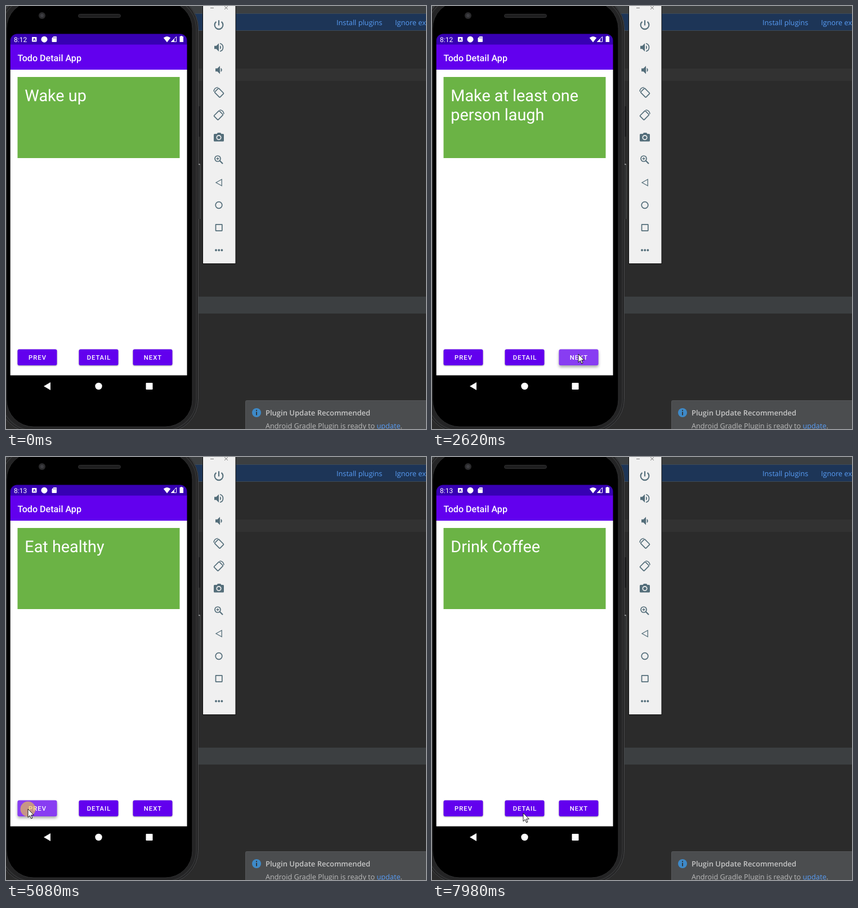
Recreate the animation shown at these times as an HTML page. Size 746 by 751 pixels, loop 8000 ms.

```html
<!DOCTYPE html>
<html lang="en">
<head>
<meta charset="utf-8">
<title>Todo Detail App</title>
<style>
  html, body { margin: 0; width: 100%; height: 100%; overflow: hidden; background: #2b2b2b; }
  svg { display: block; width: 746px; height: 751px; }
  text { text-rendering: geometricPrecision; }
  .ide { font-family: "Open Sans", "Noto Sans", sans-serif; font-size: 12.7px; }
  .app { font-family: Roboto, sans-serif; fill: #fff; }
  .label { font-size: 11.25px; font-weight: 500; letter-spacing: 1px; text-anchor: middle; }
  .tools { fill: #546e7a; }
  .line { fill: none; stroke: #546e7a; stroke-width: 1.7; }
  .bold { stroke-width: 2.1; }
  .thin { stroke-width: 1.3; }
</style>
</head>
<body>
<svg viewBox="0 0 746 751" xmlns="http://www.w3.org/2000/svg">
  <!-- editor -->
  <rect width="746" height="751" fill="#2b2b2b"/>
  <rect width="746" height="13" fill="#3c3f41"/>
  <rect x="300" y="13" width="446" height="31" fill="#1d3557"/>
  <path d="M300 13.5H746M300 43.5H746" stroke="#3c4a58"/>
  <rect x="340" y="111" width="406" height="22" fill="#323232"/>
  <rect x="340" y="516" width="406" height="30" fill="#3c3f41"/>
  <g class="ide" fill="#589df6">
    <text x="587" y="34">Install plugins</text>
    <text x="691" y="34">Ignore extension</text>
  </g>
  <rect x="425.5" y="700.5" width="330" height="60" rx="2" fill="#4b4d4f" stroke="#555759"/>
  <circle cx="445" cy="722" r="8" fill="#3e8ac8"/>
  <path d="M445 717v2M445 720.5v6" stroke="#33383d" stroke-width="2"/>
  <g class="ide" fill="#bbb">
    <text x="461" y="727" font-size="13" font-weight="600" fill="#c6c6c6">Plugin Update Recommended</text>
    <text x="461" y="750">Android Gradle Plugin is ready to <tspan fill="#589df6" text-decoration="underline">update</tspan>.</text>
  </g>

  <!-- phone body -->
  <path d="M343.5 178V232M343.5 279V378" stroke="#1c1c1d" stroke-width="3"/>
  <path d="M344.5 281V378" stroke="#58595a" stroke-width="1.2"/>
  <circle cx="343.5" cy="281" r="1.3" fill="#999"/>
  <rect x="-12" y="-18" width="354" height="775" rx="58" fill="#242425"/>
  <rect x="-8" y="-14" width="346" height="767" rx="55" fill="none" stroke="#343536" stroke-width="1.5"/>
  <rect x="-11.5" y="-17.5" width="353" height="774" rx="58" fill="none" stroke="#48494b"/>
  <rect x="1" y="-8" width="330" height="755" rx="48" fill="#000" stroke="#303132"/>
  <circle cx="64" cy="17" r="6" fill="#2a2a2c"/>
  <circle cx="64" cy="17" r="3" fill="#3d3d42"/>
  <rect x="128.5" y="14.5" width="75" height="6" rx="3" fill="#1e1e1f" stroke="#303031"/>

  <!-- app -->
  <path d="M7.7 69V61.500a12 12 0 0 1 12-12H309.500a12 12 0 0 1 12 12V69z" fill="#3700b3"/>
  <rect x="7.7" y="113" width="313.800" height="542.700" fill="#fff"/>
  <rect x="7.7" y="68.500" width="313.800" height="44.600" fill="#6200ee"/>
  <rect x="20.5" y="126" width="288" height="144" fill="#6bb345"/>
  <g class="app">
    <text id="clock" x="14" y="64" font-size="12"></text>
    <rect x="46" y="55" width="8.5" height="8.5" rx="1"/>
    <path d="M48.2 61.7L50.2 57L52.3 61.7M49 60.2H51.5" fill="none" stroke="#3700b3"/>
    <circle cx="68" cy="59.2" r="5.5"/>
    <path d="M84.5 54H89a1 1 0 0 1 1 1V63a1 1 0 0 1-1 1H82.5a1 1 0 0 1-1-1V57z"/>
    <path d="M84.5 55.5v2M86.5 55.5v2M88.5 55.5v2" stroke="#3700b3" stroke-width=".8"/>
    <path d="M286 64.5L279.8 56.5Q286 51.5 292.2 56.5z"/>
    <path d="M302.5 54.5V63.5H293.5z" fill="none" stroke="#fff"/>
    <path d="M299 58V64H293z"/>
    <path d="M310 54V53h3V54h2V64h-6.5V54z"/>
    <text x="20.5" y="97.5" font-size="16.1" font-weight="500">Todo Detail App</text>
    <g font-size="28.8">
      <text id="line0" x="33.3" y="169.2"></text>
      <text id="line1" x="33.3" y="203"></text>
    </g>
    <g id="buttons"></g>
    <path d="M67 675L79 668V682z"/>
    <circle cx="164.5" cy="675" r="6.2"/>
    <rect x="248.5" y="669" width="12" height="12" rx="1"/>
  </g>

  <!-- emulator toolbar -->
  <rect x="349.5" y="-1" width="58.5" height="458.5" fill="#f0f0f0" stroke="#0c0c0c"/>
  <path d="M363 3.500H369M388 .5L394 6M394 .5L388 6" stroke="#777" fill="none"/>
  <g class="tools">
    <path class="line bold" transform="translate(378 33.8)" d="M0-8.500V.8M-4.600-5.900A7.400 7.400 0 1 0 4.600-5.900"/>
    <g transform="translate(378 73.5)">
      <path d="M-8-2.700h3.500L0-7.300V7.300L-4.500 2.700H-8zM2-3.700Q4-2 4 0T2 3.700z"/>
      <path class="line" d="M2-7A7.200 7.200 0 0 1 2 7"/>
    </g>
    <path transform="translate(378 113.5)" d="M-6-2.700h3.500L2-7.300V7.300L-2.500 2.700H-6zM3.500-3.700Q5.800-2 5.800 0T3.500 3.700z"/>
    <g id="turn" transform="translate(378 153.5)">
      <rect class="line" x="-5.2" y="-6.6" width="10.400" height="13.200" rx="1.2" transform="translate(.6 .6) rotate(-45)"/>
      <path class="line thin" d="M-9-1.500Q-8.500-8.500-1.500-9"/>
    </g>
    <use href="#turn" transform="matrix(-1 0 0 1 756 40)"/>
    <path d="M370.5 227h4l1.500-2h5l1.500 2h3a1.500 1.500 0 0 1 1.500 1.500v10.500a1.500 1.500 0 0 1-1.500 1.500h-15a1.500 1.500 0 0 1-1.500-1.500v-10.500a1.500 1.500 0 0 1 1.500-1.500z"/>
    <circle cx="378" cy="233.5" r="3.7" stroke="#f0f0f0" stroke-width="1.7"/>
    <circle class="line" cx="376" cy="271" r="5"/>
    <path class="line bold" d="M379.5 274.500L385 280"/>
    <path class="line thin" d="M373.500 271h5M376 268.500v5"/>
    <path class="line thin" d="M373 313.500L383.200 307.800V319.200z"/>
    <circle class="line" cx="378" cy="353.5" r="5.8"/>
    <rect class="line" x="372.5" y="387.8" width="11.3" height="11.3" rx=".5"/>
    <circle cx="373" cy="433.5" r="1.9"/>
    <circle cx="378.2" cy="433.5" r="1.9"/>
    <circle cx="383.4" cy="433.5" r="1.9"/>
  </g>

  <circle id="halo" r="13.5" fill="#f2d040" opacity=".6"/>
  <path id="cursor" d="M0 0V14.800L3.400 11.600L5.700 17L8 16L5.700 10.800H10.400z" fill="#fff" stroke="#000" stroke-width=".9"/>
</svg>
<script>
const LOOP = 8000;
const CLOCK_TICK = 3310;
const todos = ["Wake up", "Drink Coffee", "Make at least one\nperson laugh", "Eat healthy", "Go to sleep"];

// start, end, steps, x, y, vertical bend
const moves = [
  [350, 1120, 11, 260, 618, 2.5],
  [3230, 3390, 3, 1.5, 632, 1],
  [3470, 3990, 8, 38, 627, 1],
  [4070, 4070, 1, 39, 625, 1],
  [6350, 6800, 7, 157, 638, 1],
  [7050, 7180, 3, 162, 632, 1]
];

// start, end, button, change of todo index
const presses = [
  [1440, 1850, 2, 1], [2000, 2310, 2, 1], [2390, 2700, 2, 1], [2820, 3080, 2, 1],
  [4220, 4620, 0, -1], [4930, 5390, 0, -1], [5560, 5940, 0, -1], [7500, 7980, 1, 0]
];

const $ = id => document.getElementById(id);
const lerp = (a, b, u) => a + (b - a) * u;
const ramp = (v, a, b) => Math.max(0, Math.min(1, (v - a) / (b - a)));

const buttons = ["PREV", "DETAIL", "NEXT"].map((label, i) => {
  const x = [20.5, 129.5, 225.5][i];
  const box = `x="${x}" y="609.5" width="70" height="28.5" rx="3"`;
  $("buttons").insertAdjacentHTML("beforeend", `
    <clipPath id="clip${i}"><rect ${box}/></clipPath>
    <rect id="face${i}" ${box} fill="#6200ee"/>
    <circle id="ripple${i}" clip-path="url(#clip${i})"/>
    <text class="label" x="${x + 35.5}" y="628">${label}</text>`);
  return { face: $("face" + i), ripple: $("ripple" + i) };
});

function cursorAt(t) {
  let x = 745, y = 702;
  for (const [start, end, steps, toX, toY, bend] of moves) {
    if (t < start) break;
    const gap = (end - start) / (steps - 1) || 1;
    const u = Math.min(steps, Math.floor((t - start) / gap + 0.001) + 1) / steps;
    const eased = u * u * (3 - 2 * u);
    x = lerp(x, toX, eased);
    y = lerp(y, toY, eased ** bend);
  }
  return [x, y];
}

function draw(t) {
  const [x, y] = cursorAt(t);
  let index = 0, active = -1, progress = 0, age = 0;
  for (const [start, end, button, change] of presses) {
    const p = (t - start) / (end - start);
    if (p >= 0.77) index += change;
    if (p >= 0 && p < 1) { active = button; progress = p; age = t - start; }
  }

  const fade = 1 - ramp(progress, 0.8, 1);
  buttons.forEach(({ face, ripple }, i) => {
    const on = i === active;
    const lift = on ? ramp(age, 0, 120) * fade : 0;
    face.style.filter = `drop-shadow(0 ${lerp(1, 3.5, lift)}px ${lerp(0.8, 2.5, lift)}px rgba(0,0,0,.35))`;
    ripple.setAttribute("cx", x);
    ripple.setAttribute("cy", y);
    ripple.setAttribute("r", on ? lerp(18, 75, ramp(age, 0, 150)) : 0);
    ripple.setAttribute("opacity", on ? 0.24 * fade : 0);
  });

  const lines = todos[index].split("\n");
  $("line0").textContent = lines[0];
  $("line1").textContent = lines[1] || "";
  $("clock").textContent = t < CLOCK_TICK ? "8:12" : "8:13";

  const place = `translate(${x} ${y})`;
  $("cursor").setAttribute("transform", place);
  $("cursor").setAttribute("visibility", t < moves[0][0] ? "hidden" : "visible");
  $("halo").setAttribute("transform", place);
  $("halo").setAttribute("visibility", active >= 0 && progress < 0.6 ? "visible" : "hidden");
}

const began = performance.now();
function frame() {
  draw((performance.now() - began) % LOOP);
  requestAnimationFrame(frame);
}
frame();
</script>
</body>
</html>
```
